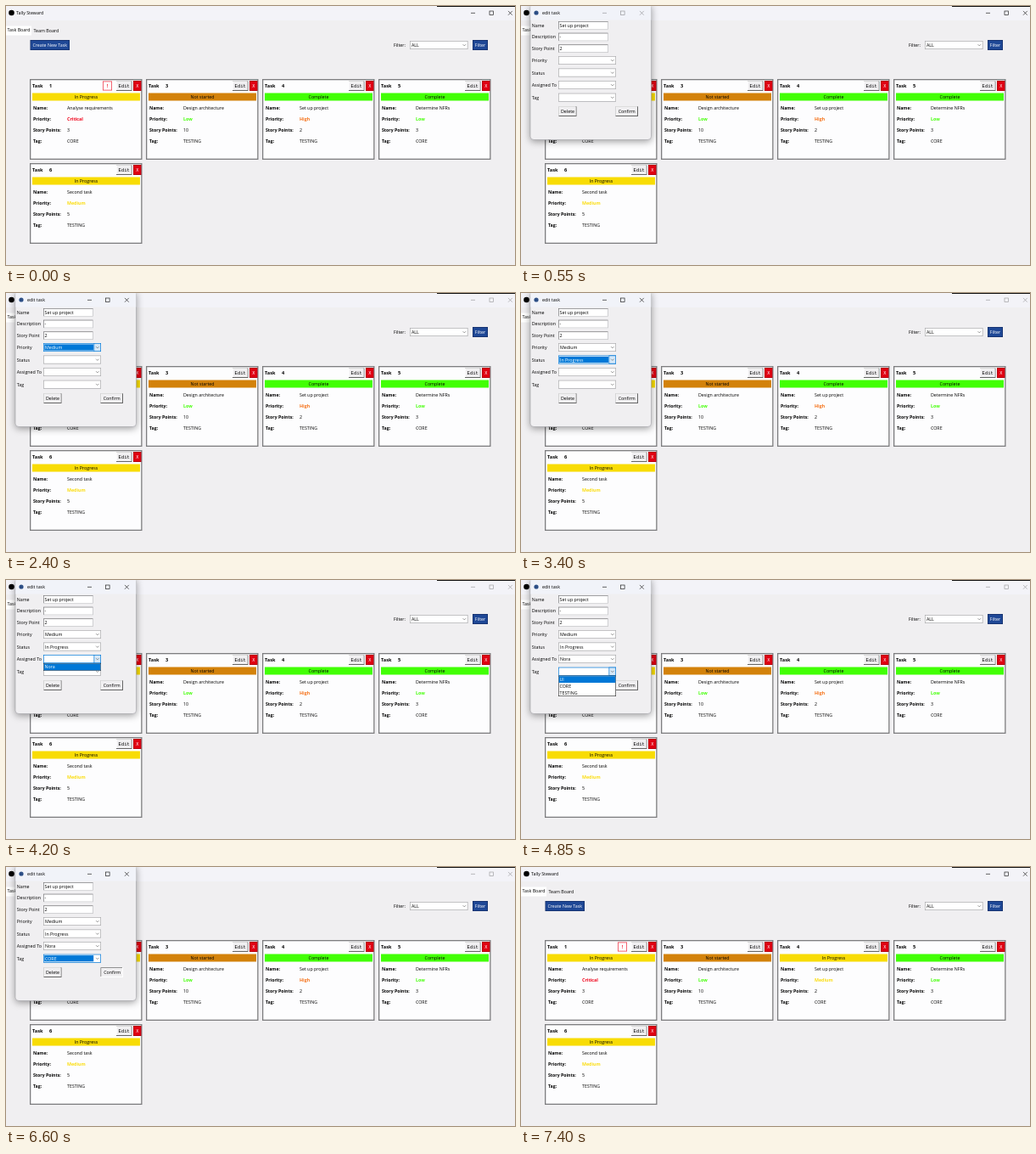
Write an HTML page with a canvas that moves like this. It is 600 by 305 pixels and loops after 7.5 s.

```html
<!DOCTYPE html>
<html lang="en">
<head>
<meta charset="utf-8">
<title>Task board</title>
<style>
  html, body { margin: 0; width: 100%; height: 100%; overflow: hidden; }
  canvas { display: block; }
</style>
</head>
<body>
<canvas id="stage" width="600" height="305"></canvas>
<script>
const ctx = document.getElementById('stage').getContext('2d');
const LOOP = 7500;
const DIALOG_OPEN = 500, DIALOG_FOCUS = 1650, CONFIRM_DOWN = 6500, DIALOG_CLOSE = 6650;
const UI = '"Open Sans", "Noto Sans", sans-serif';
const MONO = '"Liberation Mono", monospace';
const BLUE = '#1f4896', SELECT = '#0078d7', FACE = '#f0eff1';
const STATUS = { 'In Progress': '#f8dc05', 'Not started': '#d3820b', 'Complete': '#42ff05' };
const PRIORITY = { Critical: '#f00018', Low: '#42ff05', High: '#f5731a', Medium: '#fbdd10' };

// open/pick are times in ms; hover is when the pointer reaches the picked option
const combos = [
  { label: 'Priority', y: 59, options: ['Low', 'Medium', 'High', 'Critical'], pick: 1, open: 1750, hover: 2050, close: 2350 },
  { label: 'Status', y: 73.5, options: ['Not started', 'In Progress', 'Complete'], pick: 1, open: 2800, hover: 3050, close: 3300 },
  { label: 'Assigned To', y: 88, options: ['Nora'], pick: 0, open: 3750, hover: 3750, close: 4250 },
  { label: 'Tag', y: 102.7, options: ['UI', 'CORE', 'TESTING'], pick: 1, open: 4600, hover: 5300, close: 5600 },
];

function rect(x, y, w, h, color) {
  ctx.fillStyle = color;
  ctx.fillRect(x, y, w, h);
}

function box(x, y, w, h, fill, border, line = 1) {
  rect(x, y, w, h, border);
  rect(x + line, y + line, w - 2 * line, h - 2 * line, fill);
}

// y is the vertical middle of the lowercase letters
function text(str, x, y, { color = '#000', size = 5.3, bold = false, font = UI, align = 'left' } = {}) {
  ctx.font = `${bold ? 'bold ' : ''}${size}px ${font}`;
  ctx.fillStyle = color;
  ctx.textAlign = align;
  ctx.fillText(str, x, y + 2);
}

function path(points, color, width = 0.7) {
  ctx.beginPath();
  points.forEach(([x, y]) => ctx.lineTo(x, y));
  ctx.strokeStyle = color;
  ctx.lineWidth = width;
  ctx.stroke();
}

function dot(x, y, r, color) {
  ctx.beginPath();
  ctx.arc(x, y, r, 0, 7);
  ctx.fillStyle = color;
  ctx.fill();
}

function button(label, x, y, w, h, { fill = FACE, down = false, ...style } = {}) {
  const [light, dark] = down ? ['#666', '#fff'] : ['#fff', '#666'];
  rect(x, y, w, h, dark);
  rect(x, y, w - 1, h - 1, light);
  rect(x + 0.7, y + 0.7, w - 1.7, h - 1.7, fill);
  const shift = down ? 0.5 : 0;
  text(label, x + w / 2 + shift, y + h / 2 - 0.2 + shift, { align: 'center', ...style });
}

function blueButton(label, x, w) {
  box(x, 40, w, 12, BLUE, '#15306a', 0.8);
  text(label, x + w / 2, 45.7, { color: '#fff', align: 'center' });
}

function combo(x, y, w, value, { active = false, hot = false } = {}) {
  box(x, y, w, 10, '#fff', active ? SELECT : '#a9a9ab', 0.7);
  if (hot) box(x + w - 8.5, y, 8.5, 10, '#d5e8f8', SELECT, 0.7);
  if (active && value) rect(x + 1.2, y + 1.4, w - 10, 7.2, SELECT);
  text(value, x + 2, y + 5, { color: active ? '#fff' : '#000' });
  const cx = x + w - 4.2, cy = y + 5;
  path([[cx - 1.7, cy - 0.8], [cx, cy + 0.9], [cx + 1.7, cy - 0.8]], '#555', 0.6);
}

function windowControls(minX, maxX, closeX, y, color) {
  path([[minX, y], [minX + 5, y]], color);
  ctx.strokeRect(maxX, y - 2.3, 4.6, 4.6);
  path([[closeX, y - 2.4], [closeX + 4.8, y + 2.4]], color);
  path([[closeX, y + 2.4], [closeX + 4.8, y - 2.4]], color);
}

function card(col, row, { id, status, name, priority, points, tag }) {
  const x = 28 + col * 137, y = 86 + row * 99;
  box(x, y, 132.5, 95, '#fdfdfe', '#7d7d7f', 1.3);
  text('Task', x + 3, y + 7.7, { bold: true, size: 5.6 });
  text(id, x + 23, y + 7.7, { bold: true, size: 5.6 });
  if (priority === 'Critical') {
    box(x + 86, y + 2.5, 11, 11, '#fff', '#f04050', 0.8);
    text('!', x + 91.5, y + 7.8, { color: '#f00018', bold: true, align: 'center', font: MONO });
  }
  button('Edit', x + 102, y + 2.5, 18.5, 11.5, { font: MONO, size: 5.6 });
  box(x + 122, y + 2, 9.5, 12, '#e00012', '#a8000c', 0.7);
  text('X', x + 126.8, y + 7.8, { color: '#fff', align: 'center', font: MONO });
  rect(x + 3, y + 16.5, 127, 9, STATUS[status]);
  text(status, x + 66.5, y + 20.8, { align: 'center' });
  [['Name:', name], ['Priority:', priority], ['Story Points:', points], ['Tag:', tag]].forEach(([label, value], i) => {
    const lineY = y + 34.2 + i * 13;
    text(label, x + 4, lineY, { bold: true, size: 5.2 });
    const style = i === 1 ? { color: PRIORITY[value], bold: true } : {};
    text(value, x + 44, lineY, style);
  });
}

function board(t) {
  const done = t >= DIALOG_CLOSE;
  const focused = t < DIALOG_FOCUS || done;
  rect(0, 0, 600, 305, FACE);
  rect(0, 0, 600, 17, '#f3f3f8');
  rect(508, 0, 92, 1, '#111');
  dot(6.5, 8, 3.3, '#000');
  text('Tally Steward', 12, 8);
  windowControls(548, 570, 592, 8.3, focused ? '#222' : '#a0a0a2');

  rect(0, 23.5, 30, 11, '#fff');
  text('Task Board', 1.5, 28.3);
  text('Team Board', 32.5, 29.2);
  blueButton('Create New Task', 28.5, 46.5);
  text('Filter:', 457, 45.5);
  combo(476, 41, 68.5, 'ALL');
  blueButton('Filter', 550, 18);

  card(0, 0, { id: '1', status: 'In Progress', name: 'Analyse requirements', priority: 'Critical', points: '3', tag: 'CORE' });
  card(1, 0, { id: '3', status: 'Not started', name: 'Design architecture', priority: 'Low', points: '10', tag: 'TESTING' });
  card(2, 0, {
    id: '4', name: 'Set up project', points: '2',
    status: done ? 'In Progress' : 'Complete',
    priority: done ? 'Medium' : 'High',
    tag: done ? 'CORE' : 'TESTING',
  });
  card(3, 0, { id: '5', status: 'Complete', name: 'Determine NFRs', priority: 'Low', points: '3', tag: 'CORE' });
  card(0, 1, { id: '6', status: 'In Progress', name: 'Second task', priority: 'Medium', points: '5', tag: 'TESTING' });
}

function optionList({ y, options, pick, hover }, t) {
  const top = y + 10, step = 7.7;
  box(44, top, 68, options.length * step + 1.2, '#fff', '#222', 0.6);
  options.forEach((option, i) => {
    const lit = i === (t < hover ? 0 : pick);
    if (lit) rect(44.6, top + 0.6 + i * step, 66.8, step, SELECT);
    text(option, 45.5, top + 4.4 + i * step, { color: lit ? '#fff' : '#000' });
  });
}

function dialog(t) {
  ctx.save();
  ctx.shadowColor = 'rgba(0,0,0,.4)';
  ctx.shadowBlur = 9;
  ctx.shadowOffsetY = 2;
  ctx.beginPath();
  ctx.roundRect(11, -2, 142.5, 159.5, 4);
  ctx.fillStyle = FACE;
  ctx.fill();
  ctx.restore();
  ctx.strokeStyle = '#a2a2a6';
  ctx.lineWidth = 0.6;
  ctx.stroke();
  rect(11.3, 0, 142, 16.5, '#f1f3f9');
  dot(18, 8, 2.6, '#2d4f86');
  text('edit task', 25, 8);
  windowControls(96, 117.5, 140, 8.3, t < DIALOG_FOCUS ? '#98989c' : '#222');

  [['Name', 'Set up project'], ['Description', '-'], ['Story Point', '2']].forEach(([label, value], i) => {
    const y = 18 + i * 13.7;
    text(label, 12.7, y + 4.7);
    rect(44, y, 59, 9.7, '#d8d8da');
    rect(44, y, 58.4, 9.1, '#77777a');
    rect(44.7, y + 0.7, 57.7, 8.4, '#fff');
    text(value, 45.5, y + 4.7);
  });

  const current = combos.findLast(c => t >= c.open);
  for (const c of combos) {
    text(c.label, 12.7, c.y + 5);
    const active = c === current;
    const hot = active && t < c.close + 300;
    combo(44, c.y, 68, t >= c.close ? c.options[c.pick] : '', { active, hot });
  }
  button('Delete', 44.5, 118.3, 21, 11.7);
  button('Confirm', 111.5, 118.3, 26.5, 11.7, { down: t >= CONFIRM_DOWN });
  if (current && t < current.close) optionList(current, t);
}

function draw(now) {
  const t = now % LOOP;
  board(t);
  if (t >= DIALOG_OPEN && t < DIALOG_CLOSE) dialog(t);
  requestAnimationFrame(draw);
}
requestAnimationFrame(draw);
</script>
</body>
</html>
```
